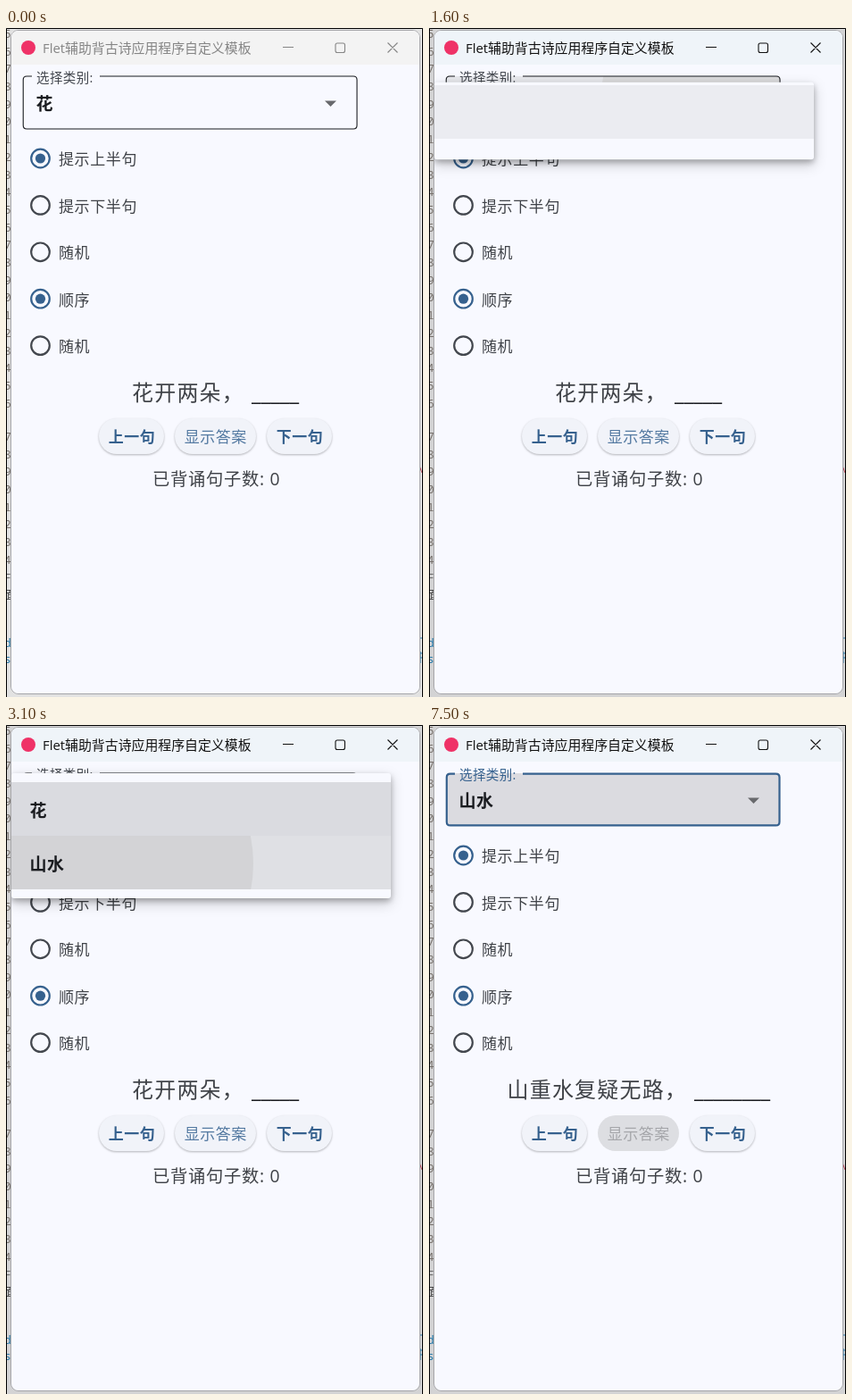
Recreate the animation shown at these times as an HTML page. Size 467x749 px, loop 8 s.

```html
<!DOCTYPE html>
<html lang="zh-CN">
<head>
<meta charset="utf-8">
<style>
  html, body { margin: 0; width: 100%; height: 100%; overflow: hidden; }
  svg { display: block; width: 467px; height: 749px; }
  text { font-family: "Open Sans", "Noto Sans CJK SC", "Noto Sans CJK", sans-serif; white-space: pre; }
  .blank { font-family: "Noto Sans", sans-serif; font-weight: 300; }
  .mono { font-family: "Noto Sans Mono", "Noto Sans CJK SC", monospace; }
  .raised { filter: drop-shadow(0 1px 1px rgba(0,0,0,.28)); }
  #menuBox { filter: drop-shadow(0 3px 3px rgba(0,0,0,.25)) drop-shadow(0 5px 7px rgba(0,0,0,.2)); }
</style>
</head>
<body>
<svg id="stage" viewBox="0 0 467 749" xmlns="http://www.w3.org/2000/svg">
  <defs>
    <clipPath id="windowClip"><rect x="6" y="3" width="457" height="742" rx="8"/></clipPath>
    <clipPath id="fieldClip"><rect x="19" y="54" width="374" height="59" rx="4"/></clipPath>
    <clipPath id="itemClip"><rect x="6" y="124" width="425" height="60"/></clipPath>
  </defs>
  <rect id="desk" width="467" height="749"/>
  <g id="gutter"></g>
  <path d="M0.5 749V.5H466.5V749" fill="none" stroke="#000"/>
  <rect x="5.5" y="2.5" width="458" height="743" rx="8.5" fill="none" stroke="#a5a5a8"/>
  <g clip-path="url(#windowClip)">
    <rect x="6" y="3" width="457" height="742" fill="#f8f9ff"/>
    <rect id="bar" x="6" y="3" width="457" height="38"/>
    <circle cx="25" cy="22" r="8" fill="#ef3267"/>
    <g id="title"></g>
    <path id="controls" d="M310 21.5H322M371 17H377.5Q379.5 17 379.5 19V25.5Q379.5 27.5 377.5 27.5H371Q369 27.5 369 25.5V19Q369 17 371 17ZM427.5 16.5L438.5 27.5M438.5 16.5L427.5 27.5" fill="none" stroke-width="1.1"/>
    <rect id="fieldFill" x="19" y="54" width="374" height="59" rx="4"/>
    <g clip-path="url(#fieldClip)"><circle id="fieldRipple" fill="#dadadc"/></g>
    <path id="fieldBorder" fill="none"/>
    <path d="M357 81.5H370L363.5 88Z" fill="#68696d"/>
    <g id="content"></g>
    <g id="menu">
      <rect id="menuBox" x="6" width="425" rx="3" fill="#f8f9ff"/>
      <rect id="item0" x="6" y="64" width="425" height="60"/>
      <rect id="item1" x="6" y="124" width="425" height="60" fill="#dfe0e4"/>
      <g clip-path="url(#itemClip)"><circle id="itemRipple" cx="123" cy="155" fill="#d3d3d6"/></g>
    </g>
  </g>
</svg>
<script>
const LOOP = 8000;
const INK = '#1a1c20', SOFT_INK = '#3f4247', GREY = '#43474e';
const BLUE = '#36618e', SOFT_BLUE = '#5379a1';
const $ = id => document.getElementById(id);
const clamp = v => Math.max(0, Math.min(1, v));
const mix = (a, b, k) => a + (b - a) * k;

function set(node, attrs) {
  for (const key in attrs) node.setAttribute(key, attrs[key]);
  return node;
}
function add(parent, tag, attrs) {
  return parent.appendChild(set(document.createElementNS('http://www.w3.org/2000/svg', tag), attrs));
}
// Places text by its left edge and the middle of its characters.
function label(parent, x, middle, size, string, attrs) {
  const node = add(parent, 'text', { x, y: middle + size * .38, 'font-size': size, fill: INK, ...attrs });
  node.textContent = string;
  return node;
}
const show = (node, on) => set(node, { visibility: on ? 'visible' : 'hidden' });

const gutter = $('gutter'), content = $('content'), menu = $('menu');

function gutterText(y, string, fill) {
  label(gutter, -2, y, 13, string, { fill, class: 'mono' });
}
for (let i = 0; i < 22; i++) gutterText(6 + i * 19.7, (i + 5) % 10, '#77716c');
for (let i = 0; i < 8; i++) gutterText(457 + i * 19.7, (i + 7) % 10, '#77716c');
gutterText(615, 'F', '#666');
gutterText(634, '面', '#444');
gutterText(688, 'd', '#2478a8');
gutterText(706, 's', '#2478a8');
add(gutter, 'path', { d: 'M463 490L466 498', stroke: '#b33b4c' });
add(gutter, 'path', { d: 'M463 683H466M463 700H466M463 705H466M464 698V711', stroke: '#2478a8' });

const title = label($('title'), 41, 22, 14.9, 'Flet辅助背古诗应用程序自定义模板');
const fieldLabel = label(content, 34, 55, 14.5, '选择类别:', { 'letter-spacing': .4 });
const fieldValue = label(content, 33.5, 85, 19, '', { 'font-weight': 700, 'letter-spacing': .6 });

const radios = ['提示上半句', '提示下半句', '随机', '顺序', '随机'].map((name, i) => {
  const cy = 146 + i * 52.4, selected = i % 3 === 0;
  const halo = add(content, 'circle', { cx: 38.5, cy, r: 25, fill: selected ? BLUE : INK });
  const ring = add(content, 'circle', { cx: 38.5, cy, r: 10.3, fill: 'none', stroke: selected ? BLUE : GREY, 'stroke-width': 2.2 });
  if (selected) add(content, 'circle', { cx: 38.5, cy, r: 5.6, fill: BLUE });
  label(content, 59, cy + 1, 17, name, { fill: SOFT_INK, 'letter-spacing': .6 });
  return { halo, ring, selected };
});

const poem = label(content, 0, 408, 24, '', { fill: SOFT_INK, 'letter-spacing': 1.2 });
const blank = label(content, 0, 408, 24, '', { class: 'blank' });

function button(x, width, name, attrs) {
  const box = add(content, 'rect', { x, y: 437, width, height: 40, rx: 20, fill: '#f1f3f9', class: 'raised' });
  const text = label(content, x + 10.7, 458, 17, name, { 'letter-spacing': .5, ...attrs });
  return { box, text };
}
button(104, 73, '上一句', { fill: BLUE, 'font-weight': 700 });
const answer = button(189, 91, '显示答案', {});
button(292, 73, '下一句', { fill: BLUE, 'font-weight': 700 });
label(content, 164, 505, 19.3, '已背诵句子数: 0', { fill: SOFT_INK, 'letter-spacing': .7 });

const items = ['花', '山水'].map((name, i) =>
  label(menu, 26.5, 96 + i * 60, 19, name, { 'font-weight': 700, 'letter-spacing': .6 }));

function drawWindow(t) {
  const active = t >= 1400;
  set($('desk'), { fill: active ? '#d3d3d4' : '#e2e2e2' });
  set($('bar'), { fill: active ? '#eff4f9' : '#f3f3f3' });
  set(title, { fill: active ? '#111' : '#858585' });
  set($('controls'), { stroke: active ? '#111' : '#858585' });
}

// The outline grows inwards and leaves a gap for the label.
function outline(width) {
  const l = 18.7 + width / 2, r = 393.6 - width / 2;
  const t = 53.5 + width / 2, b = 113.5 - width / 2;
  return `M29 ${t}H${l + 4}Q${l} ${t} ${l} ${t + 4}V${b - 4}Q${l} ${b} ${l + 4} ${b}` +
    `H${r - 4}Q${r} ${b} ${r} ${b - 4}V${t + 4}Q${r} ${t} ${r - 4} ${t}H105`;
}

function drawField(t, chosen) {
  const pressed = t >= 1400 && !chosen, width = chosen ? 2.2 : 1.1;
  set($('fieldFill'), { fill: chosen ? '#dbdbe0' : pressed ? '#e7e8ec' : '#f8f9ff' });
  set($('fieldBorder'), { d: outline(width), stroke: chosen ? BLUE : INK, 'stroke-width': width });
  set(fieldLabel, { fill: chosen ? BLUE : GREY });
  fieldValue.textContent = chosen ? '山水' : '花';
  const spread = (t - 1400) / 100;
  show($('fieldRipple'), pressed && t < 1800);
  set($('fieldRipple'), { cx: 375 - 12 * spread * spread, cy: 84, r: Math.max(0, 57 + 39 * spread) });
}

function drawMenu(t) {
  const open = clamp((t - 1500) / 300);
  const reveal = clamp((open - .25) / .25);
  const top = mix(64, 54, reveal), bottom = mix(124, 194, reveal);
  show(menu, t >= 1600 && t < 3300);
  set(menu, { opacity: t < 3200 ? 1 : .35 });
  set($('menuBox'), { y: top, height: bottom - top });
  items.forEach((item, i) => set(item, { opacity: clamp((open - .643 - i * .143) / .214) }));
  const tapped = t >= 3000;
  set($('item0'), { fill: tapped ? '#dadbe0' : '#d0d1d5', opacity: open });
  set($('item1'), { opacity: tapped ? 1 : 0 });
  set($('itemRipple'), { r: tapped ? 94 + (t - 3000) * .6 : 0 });
}

function drawRadios(t) {
  const upper = t >= 6500 && t < 7400;
  const lower = t >= 6400 && t < 6500 || t >= 7400 && t < 7500;
  radios.forEach(({ halo, ring, selected }, i) => {
    const hover = i === 0 ? upper : i === 1 && lower;
    set(halo, { opacity: hover ? .08 : 0 });
    if (!selected) set(ring, { stroke: hover ? INK : GREY });
  });
}

function drawPoem(chosen) {
  poem.textContent = chosen ? '山重水复疑无路，' : '花开两朵，';
  set(poem, { x: chosen ? 87.5 : 141 });
  blank.textContent = '_'.repeat(chosen ? 8 : 5);
  set(blank, { x: chosen ? 297 : 275 });
  set(answer.box, { fill: chosen ? '#dddee2' : '#f1f3f9', class: chosen ? '' : 'raised' });
  set(answer.text, { fill: chosen ? '#a5a6aa' : SOFT_BLUE });
}

function draw(time) {
  const t = Math.floor(time / 100) * 100; // the screen refreshes ten times a second
  const chosen = t >= 3200;
  drawWindow(t);
  drawField(t, chosen);
  drawMenu(t);
  drawRadios(t);
  drawPoem(chosen);
}

const start = performance.now();
function tick() {
  draw((performance.now() - start) % LOOP);
  requestAnimationFrame(tick);
}
tick();
</script>
</body>
</html>
```
